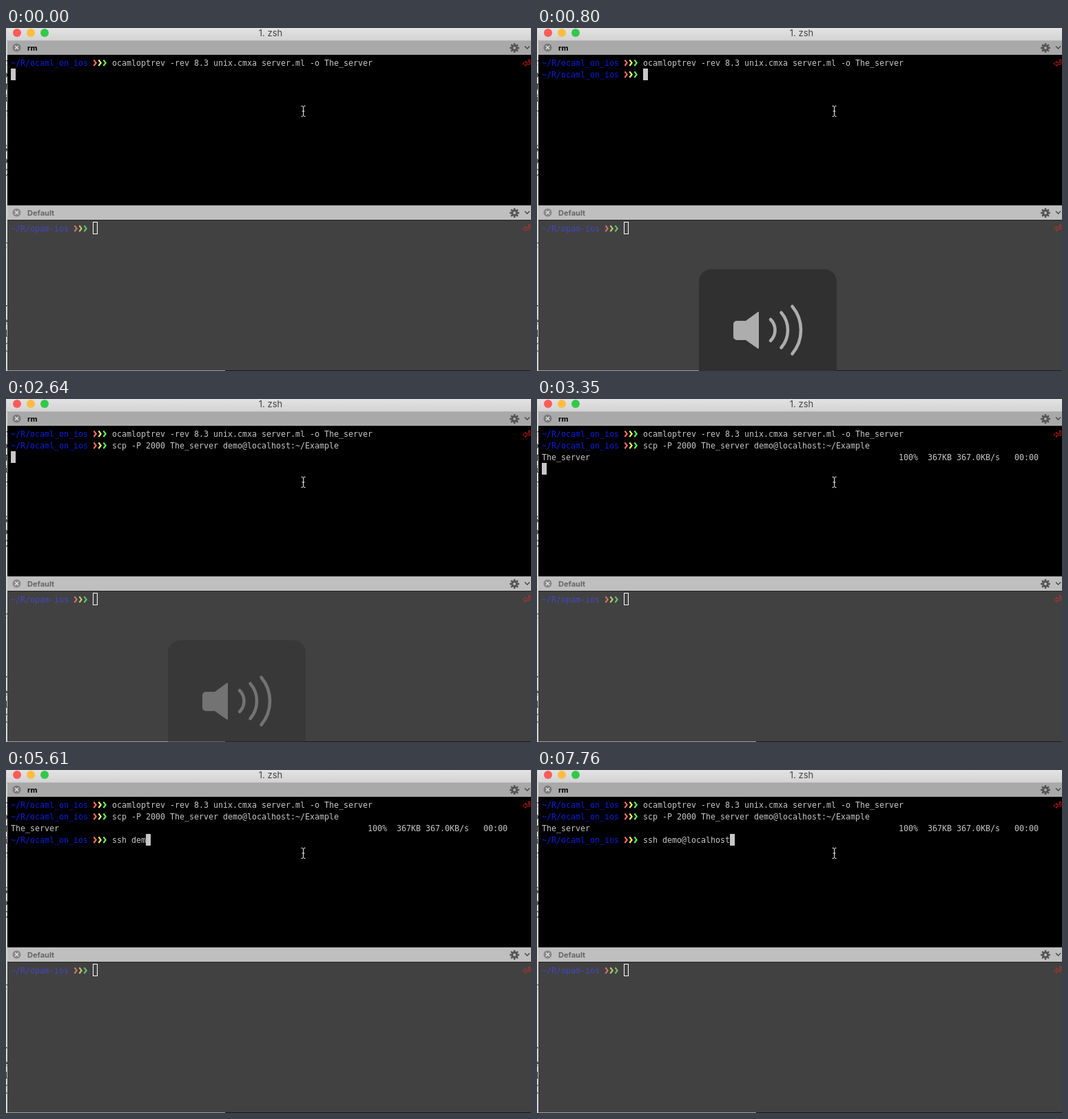
These frames come from a looping animation (762x499 px, 8000 ms). An HTML page with a canvas:

```html
<!DOCTYPE html>
<html lang="en">
<head>
<meta charset="utf-8">
<title>Terminal session</title>
<style>
html, body { margin: 0; width: 100%; height: 100%; overflow: hidden; background: #000; }
canvas { display: block; width: 762px; height: 499px; }
</style>
</head>
<body>
<canvas id="stage" width="762" height="499"></canvas>
<script>
const ctx = document.getElementById('stage').getContext('2d');
const W = 762, H = 499, LOOP = 8000;
const CELL = 7, ROW = 17, LEFT = 7, TOP = 42;
const MONO = '11.63px "DejaVu Sans Mono", monospace';
const UI = 'Inter, sans-serif';
const FG = '#c7c7c7';

const BUILD = 'ocamloptrev -rev 8.3 unix.cmxa server.ml -o The_server';
const COPY = 'scp -P 2000 The_server demo@localhost:~/Example';
const LOGIN = 'ssh demo@localhost';

// [time, value] pairs: the latest one reached applies
const RECALL = [[0, ''], [1640, BUILD], [2060, COPY]];
const TYPED = [[0, 0], [4960, 1], [5080, 2], [5170, 3], [5250, 4], [5430, 5],
  [5520, 6], [5610, 7], [5790, 8], [6750, 9], [6920, 10], [7100, 11],
  [7190, 13], [7280, 14], [7460, 15], [7640, 16], [7700, 17], [7760, 18]];
const TITLE = [[0, '1. zsh'], [3470, '1. scp'], [4250, '1. rm'], [4960, '1. zsh']];

function at(track, t) {
  let value = track[0][1];
  for (const [time, v] of track) if (t >= time) value = v;
  return value;
}

function rect(x, y, w, h, color) {
  ctx.fillStyle = color;
  ctx.fillRect(x, y, w, h);
}

function disc(x, y, r, color) {
  ctx.fillStyle = color;
  ctx.beginPath();
  ctx.arc(x, y, r, 0, Math.PI * 2);
  ctx.fill();
}

function line(points, color, width) {
  ctx.strokeStyle = color;
  ctx.lineWidth = width;
  ctx.beginPath();
  points.forEach(([x, y]) => ctx.lineTo(x, y));
  ctx.stroke();
}

function label(text, x, y, font, color, align = 'left') {
  ctx.font = font;
  ctx.fillStyle = color;
  ctx.textAlign = align;
  ctx.fillText(text, x, y);
}

// Text on the terminal's character grid
function cells(text, col, y, color = FG) {
  ctx.font = MONO;
  ctx.fillStyle = color;
  ctx.textAlign = 'left';
  [...text].forEach((ch, i) => ctx.fillText(ch, LEFT + (col + i) * CELL, y + 13));
}

const rowY = row => TOP + row * ROW;

function prompt(path, y, blue, arrows) {
  cells(path, 0, y, blue);
  arrows.forEach((color, i) => {
    const x = LEFT + (path.length + 1 + i) * CELL;
    line([[x + 1.4, y + 4.5], [x + 4.7, y + 8.7], [x + 1.4, y + 13]], color, 2.1);
  });
}

const shellPrompt = row =>
  prompt('~/R/ocaml_on_ios', rowY(row), '#0a1fdc', ['#ff6e67', '#fdfb67', '#5ff967']);

function cursor(row, col) {
  rect(LEFT + col * CELL, rowY(row), CELL, ROW, FG);
}

function returnMark(y, color) {
  line([[758.5, y - 5], [760.5, y - 5], [760.5, y + 2], [754.5, y + 2], [754.5, y + 4.5],
    [750, y + 0.8], [754.5, y - 2.7], [754.5, y - 0.3], [758.5, y - 0.3], [758.5, y - 5]], color, 1);
}

function gear(x, y, bg) {
  for (let i = 0; i < 8; i++) {
    const a = i * Math.PI / 4, c = Math.cos(a), s = Math.sin(a);
    line([[x + 3 * c, y + 3 * s], [x + 7 * c, y + 7 * s]], '#555', 2.4);
  }
  disc(x, y, 5, '#555');
  disc(x, y, 2, bg);
}

function tabBar(y, bg, name, color, badge) {
  rect(2, y, W - 2, 20, bg);
  const cy = y + 10;
  disc(15.5, cy - 0.5, 6, badge);
  line([[13, cy - 3], [18, cy + 2]], '#e2e2e2', 1.4);
  line([[18, cy - 3], [13, cy + 2]], '#e2e2e2', 1.4);
  label(name, 31, y + 14, 'bold 11px ' + UI, color);
  gear(738, cy, bg);
  line([[753, cy - 2.5], [756.5, cy + 1], [760, cy - 2.5]], '#444', 1.3);
}

function backdrop() {
  rect(0, 0, 2, H, '#d6d6d6');
  ctx.save();
  ctx.beginPath();
  ctx.rect(0, 0, 2, H);
  ctx.clip();
  [['r', 54], ['o', 72], ['J', 91], ['i', 107], ['r', 127], ['S', 180], ['o', 197],
    ['C', 215], ['r', 319], ['.', 405], ['e', 431], ['l', 449], ['(', 468]]
    .forEach(([ch, y]) => label(ch, 2.5, y, '15px "Liberation Serif", serif', '#111', 'right'));
  ctx.restore();
}

function titleBar(text) {
  const shade = ctx.createLinearGradient(0, 0, 0, 18);
  shade.addColorStop(0, '#e3e3e3');
  shade.addColorStop(1, '#d3d3d3');
  rect(1, 0, W - 1, 18, shade);
  rect(1, 18, W - 1, 1, '#b4b4b4');
  ['#fc5b57', '#fdbc40', '#34c84a'].forEach((color, i) => disc(16 + i * 20, 7, 6, color));
  label(text, 384, 12, '13px ' + UI, '#444', 'center');
}

function pointer(x, y) {
  line([[x - 3, y - 7.5], [x - 1, y - 7.5], [x, y - 6], [x, y + 6], [x - 1, y + 7.5], [x - 3, y + 7.5]], '#eee', 1);
  line([[x + 3, y - 7.5], [x + 1, y - 7.5], [x, y - 6], [x, y + 6], [x + 1, y + 7.5], [x + 3, y + 7.5]], '#eee', 1);
  line([[x - 2, y], [x + 2, y]], '#eee', 1);
}

// Sound wave with half height h and bulge s
function wave(x, cy, h, s) {
  const r = (h * h + s * s) / (2 * s), a = Math.asin(h / r);
  ctx.beginPath();
  ctx.arc(x + s - r, cy, r, -a, a);
  ctx.stroke();
}

function volume(alpha) {
  if (alpha <= 0) return;
  ctx.save();
  ctx.globalAlpha = alpha;
  ctx.beginPath();
  ctx.rect(0, 0, W, H);
  ctx.clip();
  ctx.fillStyle = '#303030';
  ctx.beginPath();
  ctx.roundRect(235, 351, 200, 200, 18);
  ctx.fill();
  const cy = 439.5;
  ctx.fillStyle = ctx.strokeStyle = '#adadad';
  ctx.beginPath();
  ctx.roundRect(285, 426, 24, 28, 5);
  ctx.moveTo(303, 426);
  ctx.lineTo(320, 413.5);
  ctx.quadraticCurveTo(322, 412, 322, 414);
  ctx.lineTo(322, 465);
  ctx.quadraticCurveTo(322, 467.5, 320, 466);
  ctx.lineTo(303, 454);
  ctx.fill();
  ctx.lineWidth = 4.6;
  ctx.lineCap = 'round';
  wave(339, cy, 15.5, 6.5);
  wave(354.5, cy, 25.5, 9.5);
  wave(370.5, cy, 34.5, 12.5);
  ctx.restore();
}

function volumeAlpha(t) {
  if (t < 800) return 0;
  if (t < 2300) return 1;
  return Math.max(0, 1 - Math.floor((t - 2300) / 95) / 6);
}

function session(t) {
  shellPrompt(0);
  cells(BUILD, 21, rowY(0));
  if (t < 120) return cursor(1, 0);

  const command = at(RECALL, t);
  shellPrompt(1);
  cells(command, 21, rowY(1));
  if (t < 2300) return cursor(1, 21 + command.length);
  if (t < 3350) return cursor(2, 0);

  cells('The_server', 0, rowY(2));
  cells('100%  367KB 367.0KB/s   00:00', 74, rowY(2));
  if (t < 3650) return cursor(3, 0);

  const count = at(TYPED, t);
  shellPrompt(3);
  cells(LOGIN.slice(0, count), 21, rowY(3));
  cursor(3, 21 + count);
}

function draw(t) {
  ctx.clearRect(0, 0, W, H);
  backdrop();
  titleBar(at(TITLE, t));

  tabBar(19, '#a9a9a9', 'rm', '#000', '#7b7b7b');
  rect(2, 39, W - 2, 219, '#000');
  session(t);
  returnMark(51, '#c41a10');
  pointer(431.5, 121);

  tabBar(259, '#bfbfbf', 'Default', '#666', '#8a8a8a');
  rect(2, 258, W - 2, 1, '#b2b2b2');
  rect(2, 279, W - 2, 1, '#222');
  rect(2, 280, W - 2, 218, '#414141');
  prompt('~/R/opam-ios', 283, '#4446c0', ['#c8776f', '#c5c468', '#68c06e']);
  ctx.strokeStyle = '#fff';
  ctx.lineWidth = 1;
  ctx.strokeRect(126.5, 282.5, 6, 17);
  returnMark(291, '#b0342c');
  rect(2, 498, 316, 1, '#a0a0a0');
  rect(318, 498, W - 318, 1, '#171b18');

  volume(volumeAlpha(t));
}

const start = performance.now();
function tick() {
  draw((performance.now() - start) % LOOP);
  requestAnimationFrame(tick);
}
tick();
</script>
</body>
</html>
```
